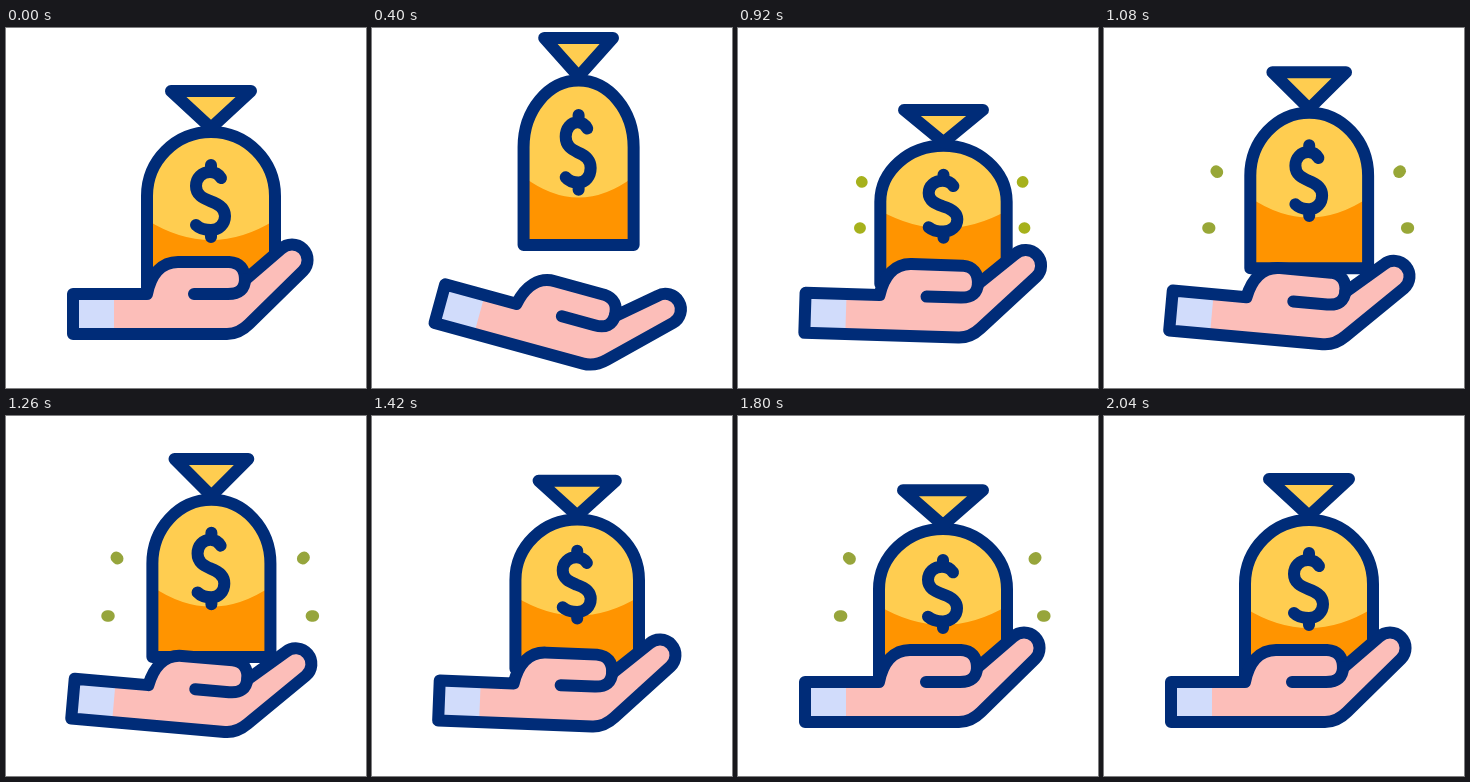
An HTML page for the animation above (2220 ms loop, 360 by 360 pixels).

```html
<!DOCTYPE html>
<html lang="en">
<head>
<meta charset="utf-8">
<title>Money bag in hand</title>
<style>
  html, body { margin: 0; width: 100%; height: 100%; overflow: hidden; background: #fff; }
  svg { display: block; width: 100vw; height: 100vh; }
  .ink { fill: none; stroke: #002c78; stroke-width: 12; stroke-linecap: round; stroke-linejoin: round; }
  path { vector-effect: non-scaling-stroke; }
</style>
</head>
<body>
<svg viewBox="0 0 360 360">
  <defs>
    <path id="sack" d="M-64 0V-94A64 64 0 0 1 64 -94V0Z"/>
    <path id="knot" d="M-40 -199H40L0 -162Z"/>
    <path id="palm" d="M67 266H141C145 246 156 234 172 234H223Q239 235 239 252L275 221A15 15 0 0 1 297 243L243 296Q233 306 221 306H67Z"/>
    <clipPath id="inside"><use href="#sack"/></clipPath>
  </defs>
  <g id="bag">
    <use href="#sack" fill="#ffcd50"/>
    <use href="#knot" fill="#ffcd50"/>
    <g clip-path="url(#inside)">
      <path id="level" fill="#ff9400" d="M-64 -20Q0 20 64 -20V90H-64Z"/>
    </g>
    <g class="ink">
      <use href="#sack"/>
      <use href="#knot"/>
      <path d="M10 -112C7 -117 3 -118 -1 -118C-9 -118 -15 -112 -15 -104C-15 -95 -8 -92 -1 -89C8 -86 14 -82 14 -74C14 -66 8 -60 0 -60C-7 -60 -12 -62 -15 -65M0 -125V-118M0 -60V-53"/>
    </g>
  </g>
  <g id="hand">
    <use href="#palm" fill="#fcbeb9"/>
    <path d="M67 266H108V306H67Z" fill="#d1dcfb"/>
    <g class="ink">
      <use href="#palm"/>
      <path d="M188 266H222Q239 266 239 251"/>
    </g>
  </g>
  <g id="sparks" stroke-linecap="round"></g>
</svg>
<script>
const LOOP = 2220;
const $ = id => document.getElementById(id);

// time, bag centre x, bag bottom y, scale x, scale y, hand angle
const keys = [
  [220, 205, 262, 1, 1, 0],
  [400, 206.6, 217, .86, 1.04, 15.3],
  [490, 206.6, 214, .85, 1.04, 15.9],
  [720, 206.6, 223, .89, 1.01, 12.8],
  [920, 205.5, 256, .987, .875, 1.8],
  [950, 205.3, 257, .99, .87, 1.3],
  [1130, 205.2, 236.5, .905, 1.01, 6],
  [1260, 205.4, 241, .922, .995, 5],
  [1600, 205, 262, 1, .9, 0],
  [2040, 205, 262, 1, 1, 0]
];

// start, first colour, extra streak length
const bursts = [
  { start: 895, from: [170, 180, 20], streak: 0 },
  { start: 1544, from: [203, 170, 28], streak: 5 }
];
const green = [150, 165, 60];
const paths = [
  { from: [127, 157], to: [111, 142] },
  { from: [127, 200], to: [102, 200] }
];
const AXIS = 204.2;

const mix = (a, b, p) => a + (b - a) * p;

// Slope of a column at a key; flat at the ends and at turning points
function slope(i, c) {
  if (i === 0 || i === keys.length - 1) return 0;
  const [a, b, d] = [keys[i - 1], keys[i], keys[i + 1]];
  const left = (b[c] - a[c]) / (b[0] - a[0]);
  const right = (d[c] - b[c]) / (d[0] - b[0]);
  return left * right <= 0 ? 0 : 2 * left * right / (left + right);
}

function pose(t) {
  t = Math.min(Math.max(t, keys[0][0]), keys[keys.length - 1][0]);
  const i = Math.max(1, keys.findIndex(k => k[0] >= t)) - 1;
  const a = keys[i], b = keys[i + 1], span = b[0] - a[0];
  const u = (t - a[0]) / span, v = 1 - u;
  return [1, 2, 3, 4, 5].map(c =>
    a[c] * (1 + 2 * u) * v * v + b[c] * (3 - 2 * u) * u * u +
    span * u * v * (slope(i, c) * v - slope(i + 1, c) * u));
}

const sparks = paths.flatMap(path => [1, -1].map(side => {
  const line = document.createElementNS("http://www.w3.org/2000/svg", "line");
  $("sparks").append(line);
  return { ...path, side, line };
}));

function drawSparks(t) {
  const burst = bursts.find(b => t >= b.start && t < b.start + 414);
  $("sparks").style.display = burst ? "" : "none";
  if (!burst) return;
  const u = (t - burst.start) / 360;
  const p = 1 - (1 - Math.min(u, 1)) ** 3;
  const size = 11.5 * Math.min(1, u / .04, Math.max(0, (1.15 - u) / .1));
  const colour = burst.from.map((c, i) => Math.round(mix(c, green[i], p)));
  $("sparks").setAttribute("stroke", `rgb(${colour})`);
  $("sparks").setAttribute("stroke-width", size);
  for (const { from, to, side, line } of sparks) {
    const dx = to[0] - from[0], dy = to[1] - from[1];
    const half = (burst.streak * (1 - p) + 2 * p) / Math.hypot(dx, dy) / 2;
    [p - half, p + half].forEach((q, i) => {
      line.setAttribute("x" + (i + 1), AXIS + side * (from[0] + dx * q - AXIS));
      line.setAttribute("y" + (i + 1), from[1] + dy * q);
    });
  }
}

function draw(t) {
  const [x, y, sx, sy, angle] = pose(t);
  $("bag").setAttribute("transform", `translate(${x} ${y}) scale(${sx} ${sy})`);
  $("level").setAttribute("transform", `translate(0 ${-50 + 110 * (sy - 1)})`);
  $("hand").setAttribute("transform", `rotate(${angle} 106 284)`);
  drawSparks(t);
}

const begin = performance.now();
function tick() {
  draw((performance.now() - begin) % LOOP);
  requestAnimationFrame(tick);
}
tick();
</script>
</body>
</html>
```
